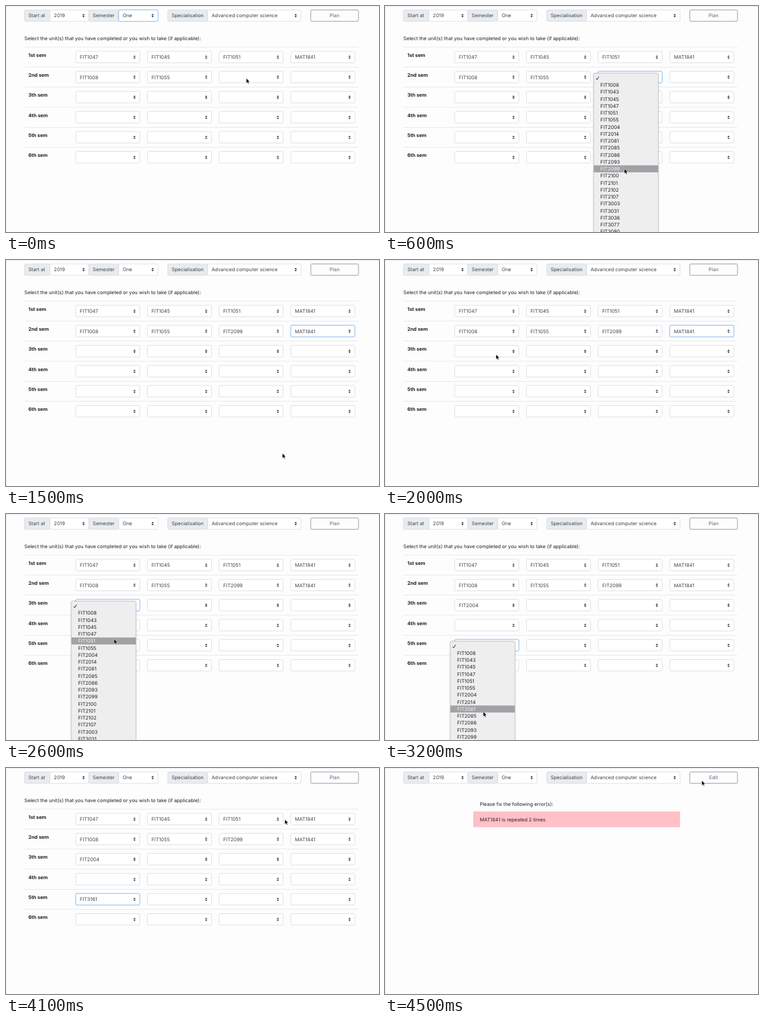
An HTML page that plays this animation: 600x364 px, repeating every 5 s.

```html
<!DOCTYPE html>
<html lang="en">
<head>
<meta charset="utf-8">
<title>Unit planner</title>
<style>
  html, body { margin: 0; width: 100%; height: 100%; overflow: hidden; background: #fdfdfe; }
  svg { display: block; width: 100vw; height: 100vh; }
  text { font: 7.85px Inter, "Liberation Sans", sans-serif; fill: #1c2024; text-rendering: geometricPrecision; }
  .value { fill: #3c4349; }
  .head { font-weight: 700; }
  .button { fill: #5f676e; text-anchor: middle; }
  .menu { filter: drop-shadow(0 .5px 1px rgba(0, 0, 0, .25)); }
  .menu text.on { fill: #f6f6f6; }
</style>
</head>
<body>
<svg id="stage" viewBox="0 0 600 364"></svg>
<script>
const LOOP = 5000, TICK = 100, ERROR_AT = 4300;
const ROW = 32.3, COL = 115.3, FIELD_H = 18.4, FIELD_W = 103, ITEM = 11.25;
const stage = document.getElementById('stage');

const units = ('1008 1043 1045 1047 1051 1055 2004 2014 2081 2085 2086 2093 2099 2100 2101 2102 2107 ' +
  '3003 3031 3036 3077 3080 3081 3134 3143 3152 3155 3159 3161 3162 3163 3164 3170 3171 ' +
  '3175 3179 3181 3182 3183').split(' ').map(n => 'FIT' + n).concat('MAT1841');

const taken = ['FIT1047 FIT1045 FIT1051 MAT1841', 'FIT1008 FIT1055'];

const picks = [
  { row: 1, col: 2, unit: 'FIT2099', open: 100, close: 700 },
  { row: 1, col: 3, unit: 'MAT1841', open: 1000, close: 1500, scroll: { from: 1100, to: 1300, by: 225 } },
  { row: 2, col: 0, unit: 'FIT2004', open: 2200, close: 2800 },
  { row: 4, col: 0, unit: 'FIT3161', open: 3000, close: 3900, scroll: { from: 3200, to: 3800, by: 281.5 } }
];

// stops of the pointer tip: time, x, y
const path = [
  [100, 386.5, 116.3], [600, 385, 262], [900, 498, 118], [1100, 495, 263], [1400, 492, 340],
  [1800, 188, 156], [2000, 178.5, 152], [2200, 178.5, 152], [2600, 173.8, 201.3], [2700, 172, 226],
  [2900, 160, 209], [3200, 158, 318.3], [3800, 158.3, 262.4], [3900, 274, 262], [4200, 509.5, 20]
];

const clamp = p => Math.min(1, Math.max(0, p));
const smooth = p => p * p * (3 - 2 * p);
const easeOut = p => 1 - (1 - p) ** 3;

function pointerAt(t) {
  const next = path.findIndex(k => k[0] > t);
  if (next < 1) return path.at(next).slice(1);
  const [t0, x0, y0] = path[next - 1], [t1, x1, y1] = path[next];
  const p = smooth((t - t0) / (t1 - t0));
  return [x0 + (x1 - x0) * p, y0 + (y1 - y0) * p];
}

const scrollAt = (s, t) => s ? s.by * easeOut(clamp((t - s.from) / (s.to - s.from))) : 0;

function add(parent, tag, attrs = {}, content) {
  const el = document.createElementNS('http://www.w3.org/2000/svg', tag);
  for (const k in attrs) el.setAttribute(k, attrs[k]);
  if (content) el.textContent = content;
  parent.appendChild(el);
  return el;
}
const label = (parent, x, mid, str, cls = '') => add(parent, 'text', { x, y: mid + 2.8, class: cls }, str);
const show = (el, on) => { el.style.display = on ? '' : 'none'; };
const fillRect = (parent, x, y, width, height, fill) => add(parent, 'rect', { x, y, width, height, fill });
const box = (parent, x, y, width, height, fill, stroke = '#ced4da') =>
  add(parent, 'rect', { x, y, width, height, rx: 2, fill, stroke, 'stroke-width': .7 });

function caret(parent, x, y) {
  add(parent, 'path', {
    d: `M${x - 1.9} ${y - .6}h3.8l-1.9 -2.3zM${x - 1.9} ${y + .6}h3.8l-1.9 2.3z`, fill: '#343a40'
  });
}

function ring(x, y, w) {
  const g = add(stage, 'g');
  box(g, x - .7, y - .7, w + 1.4, FIELD_H + 1.4, 'none', 'rgba(0,123,255,.2)');
  box(g, x, y, w, FIELD_H, 'none', '#8cc3fb');
  return g;
}

// page edge and toolbar
fillRect(stage, 0, 0, 600, .7, '#e6e6ea');
fillRect(stage, 0, 0, .7, 364, '#e6e6ea');
const BAR_Y = 6.3, BAR_MID = 15.5;
function group(x, split, end, name, value) {
  box(stage, x, BAR_Y, split - x, FIELD_H, '#e9ecef');
  box(stage, split, BAR_Y, end - split, FIELD_H, '#fff');
  label(stage, x + 6.3, BAR_MID, name, 'value');
  label(stage, split + 6.4, BAR_MID, value, 'value');
  caret(stage, end - 8.6, BAR_MID);
}
group(29.7, 70.7, 133.3, 'Start at', '2019');
group(133.3, 181.3, 244.5, 'Semester', 'One');
group(260.2, 324.3, 474.6, 'Specialisation', 'Advanced computer science');
const termRing = ring(181.3, BAR_Y, 63.2);
box(stage, 490.2, BAR_Y, 76.8, FIELD_H, '#fdfdfe', '#6c757d');
const button = label(stage, 528.6, BAR_MID, 'Plan', 'button');

// planner table
const colX = c => 112.2 + c * COL;
const rowY = r => 73 + r * ROW;
const midY = r => rowY(r) + FIELD_H / 2 + .2;
const plan = add(stage, 'g');
const unitLabel = (r, c, unit) => label(plan, colX(c) + 6.6, midY(r), unit, 'value');
label(plan, 29.6, 51.7, 'Select the unit(s) that you have completed or you wish to take (if applicable):');
['1st', '2nd', '3th', '4th', '5th', '6th'].forEach((nth, r) => {
  fillRect(plan, 29.7, rowY(r) - 7.2, 537.4, .6, '#d9dde1');
  label(plan, 36, midY(r) - 3.6, nth + ' sem', 'head');
  for (let c = 0; c < 4; c++) {
    box(plan, colX(c), rowY(r), FIELD_W, FIELD_H, '#fff');
    caret(plan, colX(c) + 94.5, midY(r));
  }
});
taken.forEach((row, r) => row.split(' ').forEach((unit, c) => unitLabel(r, c, unit)));

// error page
const fault = add(stage, 'g');
label(fault, 152.4, 58, 'Please fix the following error(s):');
fillRect(fault, 142, 70, 332.6, 25.3, '#ffc0c8');
label(fault, 152.4, 83, 'MAT1841 is repeated 2 times').style.fill = '#3b2025';

// drop-down menus
picks.forEach((m, i) => {
  m.value = unitLabel(m.row, m.col, m.unit);
  m.focus = ring(colX(m.col), rowY(m.row), FIELD_W);
  m.blur = picks[i + 1]?.open ?? ERROR_AT;
});
for (const m of picks) {
  const x = colX(m.col) - 7, w = 103.7;
  m.first = midY(m.row) + 12.5;
  m.menu = add(stage, 'g', { class: 'menu' });
  box(m.menu, x, m.first - ITEM * 1.5 - 2, w, (units.length + 1) * ITEM + 4, '#eee', '#c4c4c4');
  m.bar = fillRect(m.menu, x, 0, w, ITEM, '#a2a1a5');
  add(m.menu, 'path', {
    d: `M${x + 3.6} ${m.first - ITEM + .6}l1.7 2.2l3 -5.2`, fill: 'none', stroke: '#222'
  });
  m.items = units.map((u, i) => label(m.menu, x + 10.8, m.first + i * ITEM, u));
}

const pointer = add(stage, 'path', {
  d: 'M0 0V8.1L1.9 6.4L3.1 9.2L4.5 8.6L3.3 5.8H5.8Z',
  fill: '#000', stroke: '#fff', 'stroke-width': .6, 'stroke-linejoin': 'round'
});

function drawMenu(m, t, y) {
  const shift = scrollAt(m.scroll, t);
  const hot = Math.round((y + shift - m.first) / ITEM);
  m.menu.setAttribute('transform', `translate(0 ${-shift})`);
  m.bar.setAttribute('y', m.first + (hot - .5) * ITEM);
  show(m.bar, hot >= 0);
  m.items.forEach((el, i) => el.setAttribute('class', i === hot ? 'on' : ''));
}

function draw(t) {
  const [x, y] = pointerAt(t);
  const failed = t >= ERROR_AT;
  pointer.setAttribute('transform', `translate(${x} ${y})`);
  show(termRing, t < picks[0].open);
  show(plan, !failed);
  show(fault, failed);
  button.textContent = failed ? 'Edit' : 'Plan';
  for (const m of picks) {
    const open = t >= m.open && t < m.close;
    show(m.value, t >= m.close);
    show(m.focus, t >= m.open && t < m.blur);
    show(m.menu, open);
    if (open) drawMenu(m, t, y);
  }
}

const start = performance.now();
function frame() {
  const t = (performance.now() - start) % LOOP;
  draw(Math.floor(t / TICK) * TICK);
  requestAnimationFrame(frame);
}
frame();
</script>
</body>
</html>
```
